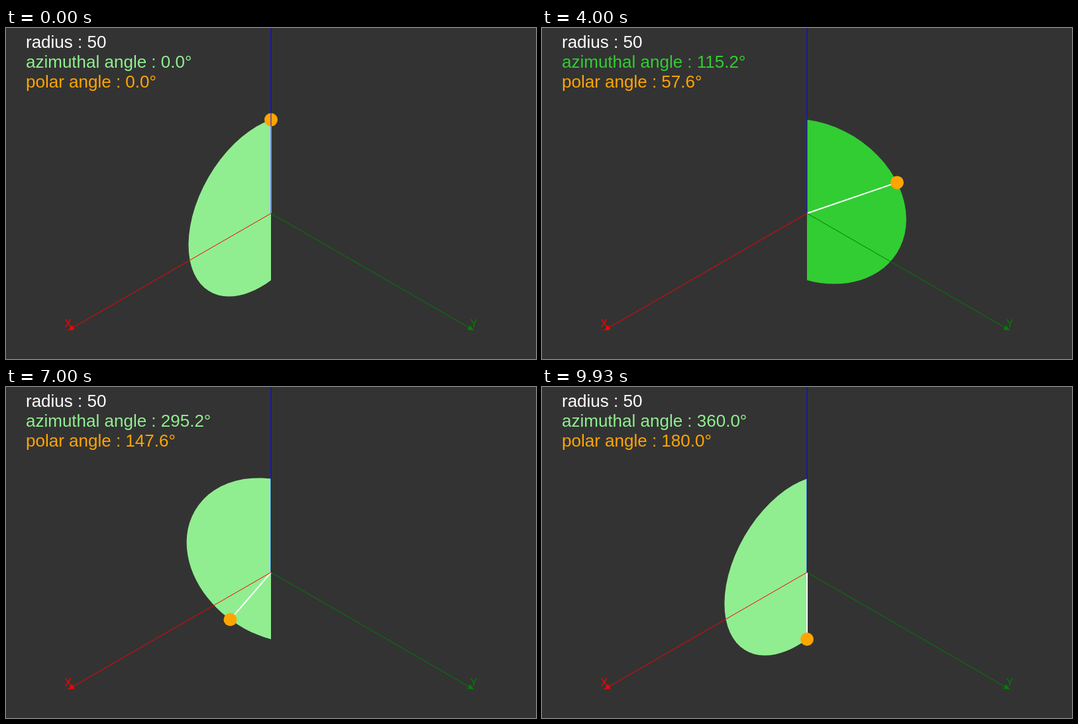
An HTML page with a canvas for the animation above (9990 ms loop, 800 px wide and 500 px high).

```html
<!DOCTYPE html>
<html>
<head>
<meta charset="utf-8">
<style>
html, body { margin: 0; width: 100%; height: 100%; overflow: hidden; background: #333; }
canvas { display: block; }
</style>
</head>
<body>
<canvas id="stage" width="800" height="500"></canvas>
<script>
const ctx = document.getElementById('stage').getContext('2d');
const RADIUS = 50, AXIS = 100, FOCAL = 500, STEPS = 150, LOOP = 9990;
const CAMERA = 100 * Math.sqrt(3); // camera at (100, 100, 100), aimed at the origin
const rad = deg => deg * Math.PI / 180;

function project(x, y, z) {
  const scale = FOCAL / (CAMERA - (x + y + z) / Math.sqrt(3));
  return [
    400 + scale * (y - x) / Math.sqrt(2),
    280 - scale * (2 * z - x - y) / Math.sqrt(6)
  ];
}

function onSphere(polar, azimuth) {
  const flat = RADIUS * Math.sin(polar);
  return project(flat * Math.cos(azimuth), flat * Math.sin(azimuth), RADIUS * Math.cos(polar));
}

function line(from, to, color, width) {
  ctx.strokeStyle = color;
  ctx.lineWidth = width;
  ctx.beginPath();
  ctx.moveTo(...from);
  ctx.lineTo(...to);
  ctx.stroke();
}

function polygon(points, color) {
  ctx.fillStyle = color;
  ctx.beginPath();
  points.forEach(p => ctx.lineTo(...p));
  ctx.fill();
}

function text(str, x, y, color, size, align) {
  ctx.font = size + 'px "Liberation Sans", Helvetica, Arial, sans-serif';
  ctx.textAlign = align;
  ctx.fillStyle = color;
  ctx.fillText(str, x, y);
}

function axis(end, color, label) {
  const origin = project(0, 0, 0), tip = project(...end);
  line(origin, tip, color, 1);
  const angle = Math.atan2(tip[1] - origin[1], tip[0] - origin[0]);
  const ux = Math.cos(angle), uy = Math.sin(angle);
  const corner = side => [tip[0] - 9 * ux - side * uy, tip[1] - 9 * uy + side * ux];
  polygon([tip, corner(4), corner(-4)], color);
  text(label, tip[0], tip[1] - 4.8, color, 16, 'center');
}

// 15 steps per second, on a 10 ms clock
function stepAt(ms) {
  const rest = ms % 200;
  return 3 * Math.floor(ms / 200) + (rest >= 70) + (rest >= 130);
}

const easeInOut = x => x < 0.5 ? 2 * x * x : 1 - 2 * (1 - x) ** 2;

function draw(ms) {
  const progress = easeInOut(stepAt(ms) / STEPS);
  const azimuth = 360 * progress, polar = 180 * progress;
  const green = azimuth < 45 || azimuth > 225 ? 'lightgreen' : 'limegreen';

  ctx.fillStyle = '#333';
  ctx.fillRect(0, 0, 800, 500);

  const arc = Array.from({ length: 37 }, (_, i) => onSphere(rad(i * 5), rad(azimuth)));
  polygon(arc, green);

  const point = onSphere(rad(polar), rad(azimuth));
  line(project(0, 0, 0), point, 'white', 2);
  ctx.fillStyle = 'orange';
  ctx.beginPath();
  ctx.arc(...point, 10, 0, 2 * Math.PI);
  ctx.fill();

  axis([AXIS, 0, 0], 'red', 'X');
  axis([0, AXIS, 0], 'green', 'Y');
  axis([0, 0, AXIS], 'blue', 'Z');

  text('radius : ' + RADIUS, 30, 30, 'white', 26, 'left');
  text(`azimuthal angle : ${azimuth.toFixed(1)}°`, 30, 60, green, 26, 'left');
  text(`polar angle : ${polar.toFixed(1)}°`, 30, 90, 'orange', 26, 'left');
}

const start = performance.now();
function tick() {
  draw((performance.now() - start) % LOOP);
  requestAnimationFrame(tick);
}
tick();
</script>
</body>
</html>
```
